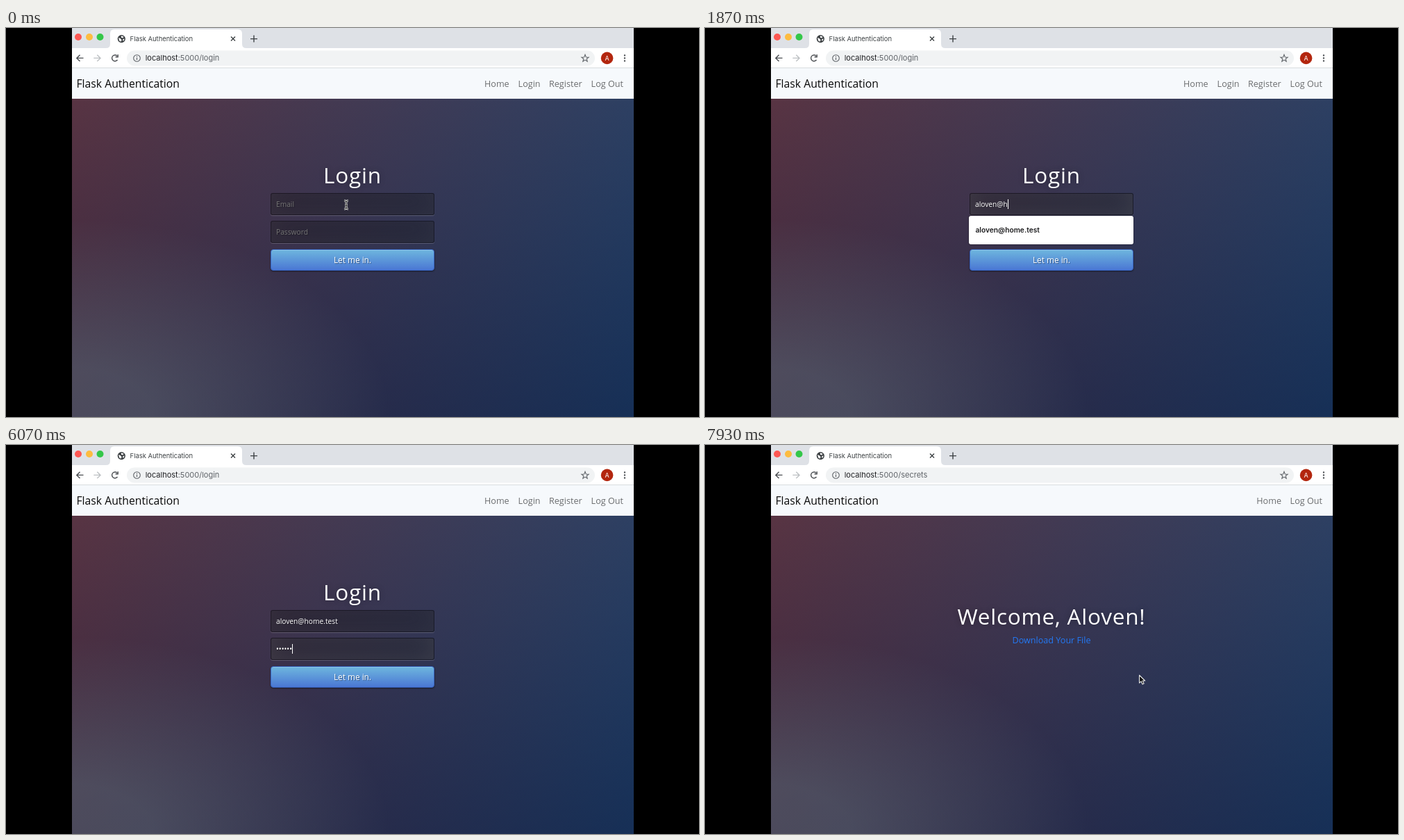
Write an HTML page that moves like this. It is 998 by 561 pixels and loops after 8 s.

```html
<!DOCTYPE html>
<html lang="en">
<head>
<meta charset="utf-8">
<title>Flask Authentication</title>
<style>
html, body { margin: 0; width: 100%; height: 100%; overflow: hidden; background: #000; }
#stage { position: relative; width: 998px; height: 561px; overflow: hidden; font-family: "Open Sans", sans-serif; color: #fff; }
#stage > * { position: absolute; }
svg { left: 0; top: 0; }
#page {
  left: 95px; top: 58px; width: 809px; height: 503px;
  background:
    radial-gradient(ellipse farthest-corner at 0 100%, rgba(104,128,138,.4) 10%, rgba(138,114,76,0) 40%),
    linear-gradient(rgba(57,173,219,.25), rgba(42,60,87,.4)),
    linear-gradient(135deg, #670d10, #092756);
}
#form, #welcome { left: 0; top: 0; }
#form > *, #welcome > * { position: absolute; box-sizing: border-box; white-space: pre; }
.heading, .link { left: 299px; width: 400px; line-height: 0; text-align: center; }
.heading { font-size: 31.5px; letter-spacing: .787px; text-shadow: 0 0 8px rgba(0,0,0,.3); }
.link { font-size: 12.6px; color: #2379f5; }
.field {
  left: 381px; width: 236px; height: 32px; padding-left: 7px; display: flex; align-items: center;
  font-size: 10.23px; text-shadow: 1px 1px 1px rgba(0,0,0,.3);
  background: rgba(0,0,0,.3); border: 1px solid rgba(0,0,0,.3); border-radius: 3px;
}
.hint { position: absolute; color: #757575; }
.caret { width: 1px; height: 14px; background: #fff; }
#button {
  left: 381px; top: 319px; width: 236px; height: 31px; line-height: 29px; font-size: 11.8px; text-align: center;
  text-shadow: 1px 1px 1px rgba(0,0,0,.4); border: 1px solid #3762bc; border-radius: 4px;
  background: #4a77d4 linear-gradient(#6eb6de, #4a77d4) no-repeat;
}
#list {
  left: 380px; top: 271px; width: 237px; padding: 6.3px 9.5px; border-radius: 3px; background: #fff;
  box-shadow: 0 0 1px 1px rgba(0,0,0,.2); color: #1c1c1e; font: 600 10.2px/28.4px Inter, sans-serif;
}
.ui { font-family: Inter, sans-serif; }
</style>
</head>
<body>
<div id="stage">
  <div id="page"></div>

  <div id="form">
    <div class="heading" style="top:212px">Login</div>
    <div class="field" id="email" style="top:238px"><span class="hint">Email</span><span class="value"></span><i class="caret"></i></div>
    <div class="field" id="password" style="top:278px"><span class="hint">Password</span><span class="value"></span><i class="caret"></i></div>
    <div id="button">Let me in.</div>
    <div id="list"></div>
  </div>

  <div id="welcome">
    <div class="heading" style="top:247px">Welcome, Aloven!</div>
    <div class="link" style="top:282px">Download Your File</div>
  </div>

  <svg width="998" height="561" fill="none">
    <!-- tab strip -->
    <path fill="#dee1e6" d="M95 0H904V29H95Z"/>
    <circle cx="104" cy="13" r="5" fill="#fc5753"/>
    <circle cx="120" cy="13" r="5" fill="#fdbc40"/>
    <circle cx="135.5" cy="13" r="5" fill="#34c749"/>
    <path fill="#fff" d="M144 29Q150 29 150 23V8Q150 2 156 2H334Q340 2 340 8V23Q340 29 346 29Z"/>
    <g id="globe">
      <circle cx="166.3" cy="15.6" r="5.6" fill="#3c4043"/>
      <path fill="#fff" d="M162 14l3 1.2 1.6 2-1 2.6-2.4-1.4zM166 11.2l3.4 1.2-1 2-2.6-.6zM168.4 16l2.2-.4-1 2.6-1.4.4z"/>
    </g>
    <text class="ui" x="178.6" y="19" font-size="9.44" fill="#3c4043">Flask Authentication</text>
    <path stroke="#3c4043" stroke-width="1.4" d="M324 12.6l6 6m0-6l-6 6M352 15.6h10m-5-5v10"/>

    <!-- toolbar -->
    <path fill="#fff" d="M95 29H904V58H95Z"/>
    <g stroke="#4a4d51" stroke-width="1.4">
      <path d="M111.5 43.4h-9.6m4.6-4.7l-4.7 4.7 4.7 4.7"/>
      <path stroke="#bdc0c3" d="M126.3 43.4h9.6m-4.6-4.7l4.7 4.7-4.7 4.7"/>
      <path id="reload" d="M160.5 46a4.4 4.4 0 1 1 -.4-5.8M161.2 38.2v3.6h-3.6"/>
      <path id="stop" d="M153 39.4l8 8m0-8l-8 8"/>
    </g>
    <rect x="174" y="32.5" width="674" height="22" rx="11" fill="#f1f3f4"/>
    <circle cx="188.5" cy="43.5" r="4.8" stroke="#5f6368" stroke-width="1.1"/>
    <path stroke="#5f6368" stroke-width="1.2" d="M188.5 42.8v3.3m0-5.6v1.2"/>
    <text class="ui" x="200.7" y="47.4" font-size="11" fill="#202124">localhost<tspan fill="#5f6368">:5000/<tspan id="path"></tspan></tspan></text>
    <path id="star" stroke="#5f6368" stroke-width="1.1"/>
    <circle cx="865.6" cy="43.4" r="8.8" fill="#b3260e"/>
    <text class="ui" x="865.6" y="46.7" font-size="9" fill="#fff" text-anchor="middle">A</text>
    <path stroke="#4a4d51" stroke-width="2.4" stroke-linecap="round" d="M891 39.4v0m0 4v0m0 4v0"/>

    <!-- site navigation -->
    <path fill="#f6f9fc" d="M95 58H904V102H95Z"/>
    <path stroke="#d9dcdf" d="M95 57.5H904"/>
    <text x="101.5" y="85.6" font-size="15.74" fill="#080808">Flask Authentication</text>
    <g font-size="12.6" fill="#6b6d6f">
      <g id="guestLinks"><text x="689" y="85">Home</text><text x="737.6" y="85">Login</text><text x="782" y="85">Register</text></g>
      <text id="memberLinks" x="794.3" y="85">Home</text>
      <text x="842.6" y="85">Log Out</text>
    </g>

    <g id="cursor" stroke-linejoin="round">
      <g id="ibeam">
        <path stroke="#ddd" stroke-width="2.8" d="M-3-6.2Q0-6 0-4Q0-6 3-6.2M0-4V4M-3 6.2Q0 6 0 4Q0 6 3 6.2M-2 1H2"/>
        <path stroke="#222" d="M-3-6.2Q0-6 0-4Q0-6 3-6.2M0-4V4M-3 6.2Q0 6 0 4Q0 6 3 6.2M-2 1H2"/>
      </g>
      <path id="hand" fill="#fff" stroke="#111" stroke-width=".9" d="M-1.2 1Q0-.8 1 1L1.7 4.3Q3 3.6 3.6 4.8Q5 4.4 5.3 5.6Q6.6 5.6 6.6 7L6.3 9.5L5.6 12H.4L-3 7.6Q-3.2 5.8-1.3 6.6L-.3 7.4Z"/>
      <path id="arrow" fill="#111" stroke="#e8e8e8" stroke-width="1.1" d="M0 0V11.2L2.6 8.8L4.5 13L6.6 12L4.7 8H8.2Z"/>
    </g>
  </svg>
</div>

<script>
const LOOP = 8000;
const EMAIL = "aloven@home.test";
const EMAIL_KEYS = [930, 1070, 1130, 1200, 1270, 1330, 1530, 1870, 2000, 2130, 2330, 2530, 2600, 3330, 3330, 3400];
const PASSWORD_KEYS = [4270, 4330, 4400, 4600, 4800, 5070];
const FOCUS = { email: 200, password: 3600, button: 7070 };
const PAGE_LOADED = 7200, LOADING_DONE = 7270;
const SUGGESTIONS = [
  { from: 330, to: 930, rows: ["fghfgh@vnmv.test", "sdfsdf", EMAIL, "agent@home.test", "dfgdfg", "sdf"] },
  { from: 930, to: 1070, rows: [EMAIL, "agent@home.test", "asdasd", "asd"] },
  { from: 1070, to: 3400, rows: [EMAIL] },
];

const $ = id => document.getElementById(id);
const show = (el, on) => { el.style.display = on ? "" : "none"; };
const ramp = (t, start, length) => Math.min(1, Math.max(0, (t - start) / length));
const easeOut = p => 1 - (1 - p) ** 2;
const smooth = p => p * p * (3 - 2 * p);
const mix = (a, b, p) => a + (b - a) * p;

const starPoint = (_, i) => {
  const angle = i * Math.PI / 5, r = i % 2 ? 2.3 : 5.4;
  return [834 + r * Math.sin(angle), 43.8 - r * Math.cos(angle)];
};
$("star").setAttribute("d", "M" + Array.from({ length: 10 }, starPoint).join("L") + "Z");

function drawField(id, text, keys, start, end, t) {
  const field = $(id);
  const typed = keys.filter(k => k <= t);
  const lastInput = Math.max(start, ...typed);
  const glow = easeOut(ramp(t, start, 500)) - easeOut(ramp(t, end, 500));
  field.style.boxShadow =
    `inset 0 -4px 35px rgba(100,100,100,${.2 + .2 * glow}), 0 1px 1px rgba(255,255,255,.2)`;
  field.querySelector(".value").textContent = text.slice(0, typed.length);
  show(field.querySelector(".hint"), !typed.length);
  show(field.querySelector(".caret"), t >= start && t < end && (t - lastInput) % 1000 < 500);
}

function drawButton(t, hoverSince) {
  const ring = 2.5 * ramp(t, FOCUS.button, 60);
  $("button").style.backgroundPositionY = -11.8 * ramp(t, hoverSince, 100) + "px";
  $("button").style.boxShadow =
    `inset 0 1px 0 rgba(255,255,255,.2), 0 1px 2px rgba(0,0,0,.5), 0 0 0 ${ring}px rgba(20,95,215,.7)`;
}

function drawCursor(t) {
  const toButton = smooth(ramp(t, 6270, 530)), away = smooth(ramp(t, 7660, 270));
  let x = 490, y = 255, shape = "ibeam";
  if (t >= 6270) {
    x = mix(mix(608, 559, toButton), 625.5, away);
    y = mix(mix(361, 339, toButton), 332, away);
    shape = y < 350 && !away ? "hand" : "arrow";
  }
  for (const id of ["ibeam", "hand", "arrow"]) show($(id), id === shape);
  show($("cursor"), t < 530 || t >= 6270);
  $("cursor").setAttribute("transform", `translate(${x} ${y})`);
}

function draw(t) {
  const loggedIn = t >= PAGE_LOADED;
  const loading = t >= FOCUS.button && t < LOADING_DONE;
  show($("form"), !loggedIn);
  show($("welcome"), loggedIn);
  show($("guestLinks"), !loggedIn);
  show($("memberLinks"), loggedIn);
  show($("globe"), !loading);
  show($("reload"), !loading);
  show($("stop"), loading);
  $("path").textContent = loggedIn ? "secrets" : "login";

  drawField("email", EMAIL, EMAIL_KEYS, FOCUS.email, FOCUS.password, t);
  drawField("password", "••••••", PASSWORD_KEYS, FOCUS.password, FOCUS.button, t);
  drawButton(t, 6535);

  const list = SUGGESTIONS.find(s => t >= s.from && t < s.to);
  show($("list"), list);
  $("list").textContent = list ? list.rows.join("\n") : "";
  drawCursor(t);
}

const startTime = performance.now();
function tick() {
  draw((performance.now() - startTime) % LOOP);
  requestAnimationFrame(tick);
}
tick();
</script>
</body>
</html>
```
